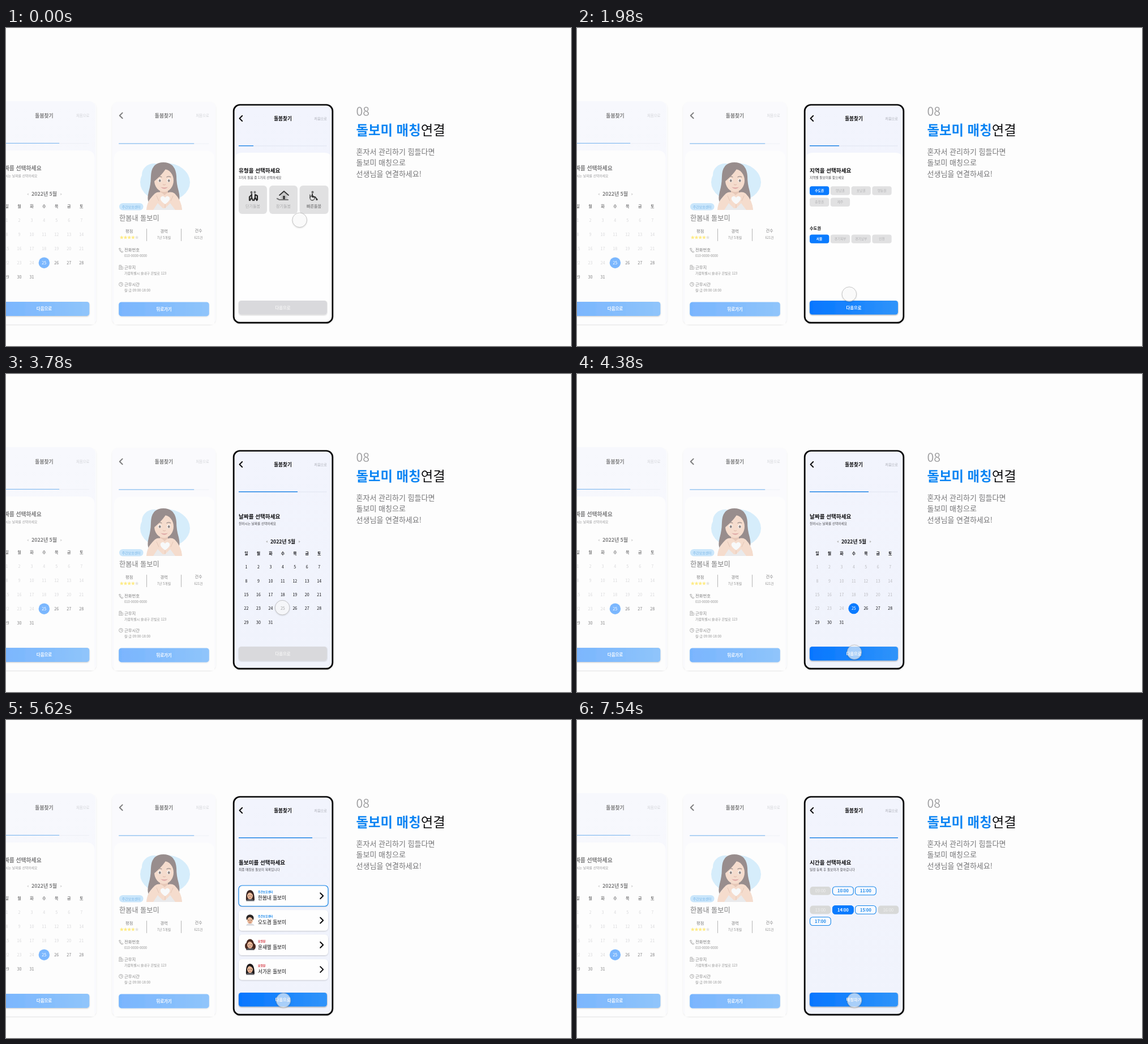
These frames come from a looping animation (998x561 px, 7560 ms). An HTML page:

```html
<!DOCTYPE html>
<html lang="ko">
<head>
<meta charset="utf-8">
<style>
html, body { margin: 0; width: 100%; height: 100%; overflow: hidden; background: #fdfdfd; }
svg { display: block; width: 998px; height: 561px; font-family: "Noto Sans CJK KR", "Noto Sans CJK", "Noto Sans", sans-serif; }
text { white-space: pre; }
</style>
</head>
<body>
<svg id="stage" viewBox="0 0 998 561"></svg>
<script>
const LOOP = 7560, FADE = 100;
const BLUE = '#0a7bff', LINE = '#1686ea', INK = '#0c0c0e';

// Drawing helpers; text is placed by its vertical centre.
const T = (x, y, size, str, fill = INK, weight = 400, anchor = 'start') =>
  `<text x="${x}" y="${y + size * .37}" font-size="${size}" fill="${fill}" font-weight="${weight}" text-anchor="${anchor}">${str}</text>`;
const C = (x, y, size, str, fill, weight) => T(x, y, size, str, fill, weight, 'middle');
const R = (x, y, w, h, r, fill, extra = '') =>
  `<rect x="${x}" y="${y}" width="${w}" height="${h}" rx="${r}" fill="${fill}" ${extra}/>`;
const E = (x, y, rx, ry, fill, extra = '') =>
  `<ellipse cx="${x}" cy="${y}" rx="${rx}" ry="${ry}" fill="${fill}" ${extra}/>`;
const P = (d, fill, extra = '') => `<path d="${d}" fill="${fill}" ${extra}/>`;
const S = (d, color, w) =>
  `<path d="${d}" fill="none" stroke="${color}" stroke-width="${w}" stroke-linecap="round" stroke-linejoin="round"/>`;
const G = (attrs, body) => `<g ${attrs}>${body}</g>`;

// Parts shared by the screens, in the front phone's coordinates.
const header = step =>
  S('M417.3 154.8l-4.8 4.7 4.8 4.7', INK, 1.9) +
  C(489, 160, 8.6, '돌봄찾기', INK, 700) +
  T(567, 160, 6.2, '처음으로', '#a9abb4', 400, 'end') +
  `<path d="M411 208H567" stroke="#c3cbdd" stroke-width=".8" stroke-dasharray="1 1"/>` +
  `<path d="M411 207.8h${156 * step / 6}" stroke="#2488e8" stroke-width="1.4"/>`;
const titles = (title, sub) =>
  T(411, 251, 9.6, title, INK, 700) + T(411, 264.3, 5.7, sub, '#4a4a4e');
const sheet = P('M403 520V234q0-14 14-14H562q14 0 14 14V520z', '#fefefe');
const button = (label, on) =>
  R(411, 481, 156, 24.5, 4.5, on ? 'url(#blue)' : '#d9d9dc', 'filter="url(#soft)"') +
  C(489, 493.5, 7.3, label, on ? '#fff' : '#f4f4f4', 700);
const screen = (step, hasSheet, title, sub, body, label = '다음으로') =>
  R(402, 135, 175, 385, 11, 'url(#tint)') + (hasSheet ? sheet : '') +
  header(step) + titles(title, sub) + body + button(label);

// Care type
const figures = [
  S('M434 293v6l-3 5M434 299l2 5M434 294l-4 4v6', '#333', 2.2) + E(433.5, 290, 2, 2.2, '#666') +
    S('M440 294v5l-2 5M440 299l3 5M440 294l4 2v7', '#222', 2.2) + E(439.5, 289.7, 2, 2.2, '#777'),
  P('M483 295l8-7 8 7h-2v8h-12v-8z', '#c8c8c8') + S('M483 295l8-7 8 7', '#333', 1.7) +
    R(489, 296, 4, 7, 0, '#444') + S('M479 301l4 2h15', '#777', 2.2),
  E(541, 300, 4, 4, 'none', 'stroke="#444" stroke-width="1.3"') + E(549, 302.5, 1.7, 1.7, '#444') +
    S('M541 293v5h5l3 4', '#333', 2) + S('M537 294v5', '#333', 1.2) + E(541.5, 289.6, 2, 2.2, '#666')
];
const typeCard = (i, on) =>
  R([411, 465, 518.6][i], 278, i == 2 ? 51 : 50, 50, 6, on ? 'url(#blue)' : '#e1e1e2') + figures[i] +
  C([436, 490, 544][i], 314.8, 7.1, ['단기돌봄', '장기돌봄', '빠른돌봄'][i],
    on ? '#fff' : i == 2 ? '#8b8b8d' : '#aaaaac', on || i == 2 ? 700 : 400);

// Region
const chip = (i, y, label, on) =>
  R(411 + 36.8 * i, y, 34.3, 15.4, 4, on ? BLUE : '#e1e1e2') +
  C(428.1 + 36.8 * i, y + 7.7, 5.7, label, on ? '#fff' : '#b1b1b3', on ? 700 : 400);
const chips = (y, labels) => labels.map((s, i) => chip(i, y, s)).join('');

// Calendar for a month that starts on Sunday
const column = i => 424.5 + 21.45 * i;
const calendar = picked => {
  let out = C(489, 295.5, 8.7, '2022년 5월', INK, 700) +
    P('M462 293.7v4l-3-2zM517 293.7v4l3-2z', '#bbb');
  [...'일월화수목금토'].forEach((s, i) => out += C(column(i), 316.3, 6.9, s, INK, 700));
  for (let d = 1; d <= 31; d++) {
    const x = column((d - 1) % 7), y = 340.8 + 24.35 * Math.floor((d - 1) / 7);
    const chosen = picked && d == 25;
    if (chosen) out += E(x, y, 9.5, 9.5, BLUE);
    out += C(x, y, 7, d, chosen ? '#fff' : picked && d < 25 ? '#b9b9bd' : INK, picked && d < 25 ? 400 : 500);
  }
  return out;
};
const dateScreen = (picked, hasSheet) =>
  screen(4, hasSheet, '날짜를 선택하세요', '원하시는 날짜를 선택하세요', calendar(picked)) +
  (picked ? button('다음으로', true) : '');

// Carer list
const carers = [
  ['한봄내', 0], ['오도겸', 0], ['윤새별', 1], ['서가온', 1]
];
const avatar = (i, y) => {
  const man = i == 1, hair = ['#3b2724', '#2a2524', '#4a2a20', '#1f1b1c'][i];
  return (man ? E(431, y - 4, 6.6, 6, hair) : P(`M424 ${y + 8}q-1-18 7-18t8 18z`, hair)) +
    (i == 2 ? E(425, y + 2, 3, 5, hair) + E(438, y + 3, 3, 5, hair) : '') +
    P(`M424 ${y + 9.5}q1-4 7-4t8 4z`, man ? '#d8dade' : '#5a5a60') +
    E(431, y, 5, 6.3, '#eab999') +
    P(`M425.8 ${y - 1}q-1-8 5.2-8t5.2 8q-2-4-5.2-4.5t-5.2 4.5z`, hair) +
    E(429, y, .7, .8, '#222') + E(433, y, .7, .8, '#222') + S(`M429.3 ${y + 3.3}q1.7 1.2 3.4 0`, '#a04848', .7);
};
const carerCard = ([name, home], i) => {
  const y = 292 + 43.3 * i;
  return R(411, y, 158, 36.5, 6, '#fefefe', 'filter="url(#soft)"') + avatar(i, y + 18) +
    T(445, y + 11.3, 4.8, home ? '요양원' : '주간보호센터', home ? '#d0202c' : LINE, 700) +
    T(445, y + 22, 8.6, name + ' 돌보미', INK, 500) +
    S(`M555.2 ${y + 13.2}l5 5-5 5`, INK, 2);
};

// Time slots: row, column, label, disabled
const slots = [
  [0, 0, '09:00', 1], [0, 1, '10:00'], [0, 2, '11:00'],
  [1, 0, '13:00', 1], [1, 1, '14:00'], [1, 2, '15:00'], [1, 3, '16:00', 1], [2, 0, '17:00']
];
const slot = ([row, col, label, off], on) => {
  const x = 411.5 + 40 * col, y = [294, 327.5, 347.7][row];
  return R(x, y, 36.8, 14.8, 5, off ? '#d8d9d8' : on ? BLUE : '#f6f9ff',
    off ? '' : `stroke="${on ? BLUE : LINE}" stroke-width="1.1"`) +
    C(x + 18.4, y + 7.5, 7.3, label, off ? '#f0f0f0' : on ? '#fff' : LINE, off ? 400 : 700);
};

// Start time and content of every layer shown inside the phone
const layers = [
  [-FADE, screen(1, true, '유형을 선택하세요', '3가지 돌봄 중 1가지 선택하세요', [0, 1, 2].map(i => typeCard(i)).join(''))],
  [250, typeCard(2, true) + button('다음으로', true)],
  [790, screen(2, true, '지역을 선택하세요', '지역별 돌보미를 찾으세요',
    chips(279.3, ['수도권', '영남권', '호남권', '영동권']) + chips(299.6, ['충청권', '제주']))],
  [1300, chip(0, 279.3, '수도권', true) + T(411, 353.7, 7.2, '수도권', INK, 700) +
    chips(364.4, ['서울', '경기북부', '경기남부', '인천'])],
  [1660, chip(0, 364.4, '서울', true) + button('다음으로', true)],
  [2250, dateScreen(false, false)],
  [3900, dateScreen(true, false)],
  [4560, screen(5, false, '돌보미를 선택하세요', '최종 매칭된 돌보미 목록입니다', carers.map(carerCard).join(''))],
  [5020, R(411, 292, 158, 36.5, 6, 'none', `stroke="${LINE}" stroke-width="1.2"`) + button('다음으로', true)],
  [5900, screen(6, false, '시간을 선택하세요', '일정 등록 후 돌보미가 찾아갑니다',
    slots.map(s => slot(s)).join(''), '매칭하기')],
  [6420, slot(slots[4], true) + button('매칭하기', true)]
];

// Pointer stops: time, x, y
const stops = [
  [-60, 514, 344], [180, 543, 312], [340, 543, 312], [720, 494, 494.5], [920, 494, 494.5],
  [1220, 428, 289], [1380, 428, 289], [1580, 430, 373], [1740, 430, 373], [2080, 494, 494.5],
  [3350, 494, 494.5], [3820, 488, 410.5], [4050, 488, 411], [4430, 490, 494.5], [4640, 490, 494.5],
  [4960, 518, 311], [5120, 518, 311], [5560, 490, 494.5], [5980, 490, 494.5],
  [6300, 471, 336], [6500, 471, 336], [6900, 490, 494.5], [LOOP, 490, 494.5]
];

// Faded cards behind the phone
const cardAt = (x, y, body) => G(`transform="translate(${x} ${y}) scale(1.023) translate(-489 -160)"`, body);
const cardBase = x => R(x, 130.5, 183, 392.5, 10, '#f8f9fe', 'filter="url(#soft)"');

const portrait =
  E(281, 272, 44, 34, '#b5dffa') + E(262, 259, 22, 20, '#b5dffa') +
  P('M254 309q-6-4-2-20 4-14 4-28 1-24 22-24t23 24q0 14 4 27 4 17-3 22z', '#3f2c2b') +
  P('M248 321q2-23 18-26h28q14 3 17 26z', '#d9dade') +
  P('M272 283h14v12q-7 7-14 0z', '#d49a7c') +
  E(279, 269, 17, 20, '#efc0a3') +
  P('M260 272q-2-30 19-31 20 1 19 31-2-16-15-25-6 11-23 25z', '#3f2c2b') +
  [271.5, 287.5].map(x => E(x, 269, 3, 3.2, '#fff') + E(x + .2, 269.3, 2, 2.5, '#36241f') +
    S(`M${x - 3.6} 263q3.6-2.4 7 0`, '#4a302a', 1.2)).join('') +
  S('M277.5 276q2 1.6 4 0', '#c98769', 1.3) + P('M273 280.5q6.5 2 13 0-6 6.5-13 0z', '#c25a58') +
  P('M248 321q1-16 15-29 9-6 17 3 9-9 18-3 12 12 13 29h-12l-9-12-9 9h-4l-9-9-8 12z', '#efc0a3') +
  P('M281 311q-10-7-8-12 4-5 8 0 4-5 8 0 2 5-8 12z', '#f5f6f8') +
  S('M266 296l4 9M295 296l-4 9M281 311v6', '#cf9678', 1);

const stars = [0, 1, 2, 3, 4].map(i =>
  P(`M${204.3 + 6.7 * i} 366l1 2.3 2.4.2-1.8 1.6.6 2.4-2.2-1.3-2.2 1.3.6-2.4-1.8-1.6 2.4-.2z`, i < 4 ? '#ffdc20' : '#ccc')).join('');
const info = (y, label, value) => T(209, y, 7.3, label, INK, 500) + T(209, y + 10.4, 5.9, value, '#333');
const profile =
  portrait + R(200, 309, 42.5, 12.5, 6.2, '#9dd3fa') +
  C(221.3, 315.3, 6, '주간보호센터', '#0878d6') +
  T(200, 335, 12.2, carers[0][0] + ' 돌보미', INK, 500) +
  C(217.7, 358.5, 7.2, '평점', INK, 500) + stars +
  C(279, 358.5, 7.2, '경력', INK, 500) + C(279, 369.5, 5.9, '7년 5개월', '#333') +
  C(340, 357.7, 7.2, '건수', INK, 500) + C(340, 369.5, 5.9, '621건', '#333') +
  S('M248.5 354.5v21M309.5 354.5v21', '#555', .8) +
  info(391.5, '전화번호', '010-0000-0000') +
  info(422, '근무지', '가람특별시 솔내구 은빛로 123') +
  info(452.2, '근무시간', '월-금 09:00-18:00') +
  S('M200 389.2l1.7-.8 1.3 2.2-1 1.1q1 2 2.5 2.7l1-1 1.3 1.3-1.2 1.4q-5-1-5.6-6.9z', '#444', .8) +
  S('M200 425.5v-7h3.5v7M203.5 421.5h3v4H199.5M201 420.5h1.3M201 422.5h1.3', '#444', .7) +
  E(203, 452.2, 3.4, 3.4, 'none', 'stroke="#444" stroke-width=".8"') + S('M203 450v2.4h1.8', '#444', .7);

const stage = document.getElementById('stage');
stage.innerHTML = `<defs>
  <linearGradient id="blue"><stop stop-color="#0576ff"/><stop offset="1" stop-color="#3094fa"/></linearGradient>
  <linearGradient id="tint" x2="0" y2="1"><stop stop-color="#f2f4fd"/><stop offset="1" stop-color="#f0f3fc"/></linearGradient>
  <filter id="soft" x="-10%" y="-20%" width="120%" height="150%">
    <feDropShadow dx="0" dy="1" stdDeviation="1.2" flood-opacity=".2"/></filter></defs>` +
  G('opacity=".53"', cardBase(-23.5) + cardAt(67.5, 154.5, dateScreen(true, true))) +
  G('opacity=".53"', cardBase(187.5) + cardAt(279, 155, sheet + header(5) + button('뒤로가기', true)) + profile) +
  R(401, 134, 177, 387, 12, '#fff', 'filter="url(#soft)"') +
  layers.map(([, body]) => G('class="layer"', body)).join('') +
  R(402.2, 135.5, 174.6, 384.4, 11, 'none', 'stroke="#050505" stroke-width="2.7"') +
  G('id="pointer"', `<circle r="12.8" fill="#fff" fill-opacity=".6" stroke="#999" stroke-opacity=".6" stroke-width=".9" filter="url(#soft)"/>`) +
  T(618.5, 146.8, 21.2, '08', '#a3a3a5', 300) +
  T(618.5, 180.3, 23.4, '<tspan fill="#0b84f3" font-weight="700">돌보미 매칭</tspan>연결', INK, 500) +
  ['혼자서 관리하기 힘들다면', '돌보미 매칭으로', '선생님을 연결하세요!']
    .map((s, i) => T(618.5, 218.3 + 19.3 * i, 13, s, '#757577')).join('');

const groups = [...stage.querySelectorAll('.layer')];
const pointer = document.getElementById('pointer');
const clamp = v => Math.max(0, Math.min(1, v));
const ease = k => k * k * (3 - 2 * k);

function render() {
  const t = performance.now() % LOOP;
  groups.forEach((g, i) => g.setAttribute('opacity', clamp((t - layers[i][0]) / FADE)));
  const next = stops.findIndex(s => s[0] > t);
  const [t0, x0, y0] = stops[next - 1], [t1, x1, y1] = stops[next];
  const k = ease((t - t0) / (t1 - t0));
  pointer.setAttribute('transform', `translate(${x0 + (x1 - x0) * k} ${y0 + (y1 - y0) * k})`);
  requestAnimationFrame(render);
}
render();
</script>
</body>
</html>
```
